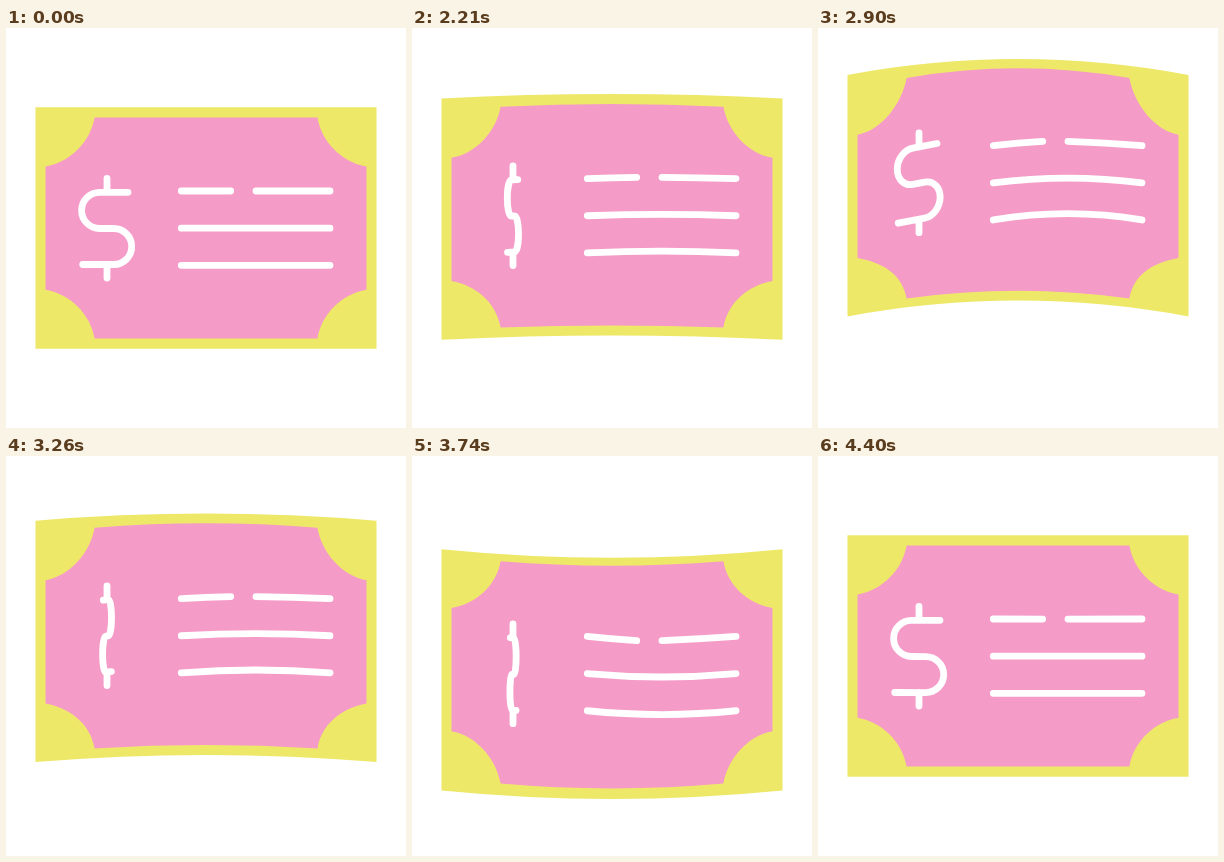
Animation of 400x400 px, one loop 4.43 s. Source, as an HTML page:

```html
<!DOCTYPE html>
<html lang="en">
<head>
<meta charset="utf-8">
<title>Flying banknote</title>
<style>
  html, body { margin: 0; height: 100%; overflow: hidden; background: #fff; }
  svg { display: block; width: 100vw; height: 100vh; }
  .ink { fill: none; stroke: #fff; stroke-width: 6.8; stroke-linecap: round; stroke-linejoin: round; }
</style>
</head>
<body>
<svg viewBox="0 0 400 400">
  <path id="paper" fill="#eee868"/>
  <path id="panel" fill="#f59bc8"/>
  <path id="lines" class="ink"/>
  <path id="dollar" class="ink" vector-effect="non-scaling-stroke"
    d="M122 164.3H93.7a18 18 0 0 0 0 36.2H107.7a18 18 0 0 1 0 36H76.7M101 150.3V164.3M101 236.5V250"/>
</svg>
<script>
const LOOP = 4430, REST = 2030, START = 2000;
const [paper, panel, lines, dollar] =
  ['paper', 'panel', 'lines', 'dollar'].map(id => document.getElementById(id));

// Cubic bezier easing with end handles at (a, 0) and (b, 1)
function ease(x, a, b) {
  let lo = 0, hi = 1;
  for (let i = 0; i < 24; i++) {
    const s = (lo + hi) / 2, r = 1 - s;
    if (3 * a * s * r * r + 3 * b * s * s * r + s * s * s < x) lo = s; else hi = s;
  }
  return lo * lo * (3 - 2 * lo);
}

// Segments: end time, value reached, easing handles
const segments = [[2810, -49, .45, .09], [3820, 23, .52, .5], [4420, 0, .45, .5]];

function liftAt(t) {
  if (t < REST) return 0;
  let from = START, value = 0;
  for (const [end, next, a, b] of segments) {
    if (t < end) return value + (next - value) * ease((t - from) / (end - from), a, b);
    from = end;
    value = next;
  }
  return value;
}

// Two turns: steady speed, then an even slowdown to rest
function spinAt(t) {
  if (t < REST) return 0;
  const speed = .365, steady = 1480, time = t - START;
  if (time < steady) return speed * time;
  const slowdown = 2 * (720 - speed * steady) / speed;
  const d = Math.min(time - steady, slowdown);
  return speed * (steady + d - d * d / (2 * slowdown));
}

function draw(t) {
  const m = liftAt(t);
  // Share of the lift for a point, on the way up and on the way down
  const move = (y, up, down) => y + m * (m < 0 ? up : down);
  // Parabola through its middle height to the end point
  const arch = (mid, x, end, cx = 200) => `Q${cx} ${2 * mid - end} ${x} ${end}`;

  const top = move(79.3, .67, .62), bottom = move(320.7, .67, .62);
  paper.setAttribute('d',
    `M29.5 ${top}${arch(79.3 + m, 370.5, top)}V${bottom}${arch(320.7 + m, 29.5, bottom)}Z`);

  const pt = move(89.5, .82, .7), pb = move(310.5, .83, .76);
  const side = move(0, .66, .6), st = 138.5 + side, sb = 261.8 + side;
  panel.setAttribute('d',
    `M39.5 ${st}C64.3 ${st - 4.4} 84.3 ${pt + 24.6} 88.6 ${pt}` +
    arch(move(89.5, 1.02, .9), 311.4, pt) +
    `C315.7 ${pt + 24.6} 335.7 ${st - 4.4} 360.5 ${st}V${sb}` +
    `C335.7 ${sb + 4.4} 315.7 ${pb - 24.6} 311.4 ${pb}` +
    arch(move(310.5, .99, .98), 88.6, pb) +
    `C84.3 ${pb - 24.6} 64.3 ${sb + 4.4} 39.5 ${sb}Z`);

  const [y1, y2, y3] = [163, 200.2, 237.3].map(y => move(y, .94, .78));
  const inner = move(163, 1.03, .97), bend = move(163, 1, .9);
  lines.setAttribute('d',
    `M175.3 ${y1}Q200 ${bend} 224.7 ${inner}M250 ${inner}Q287 ${bend} 324 ${y1}` +
    `M175.3 ${y2}${arch(move(200.2, 1.04, .93), 324, y2, 249.7)}` +
    `M175.3 ${y3}${arch(move(237.3, 1.07, .95), 324, y3, 249.7)}`);

  const turn = Math.cos(spinAt(t) * Math.PI / 180), slope = .004 * m;
  dollar.setAttribute('transform',
    `translate(101 ${move(0, .94, .79)}) matrix(${turn} ${slope * turn} 0 1 0 0) translate(-101 0)`);
}

const begin = performance.now();
function tick() {
  draw((performance.now() - begin) % LOOP);
  requestAnimationFrame(tick);
}
tick();
</script>
</body>
</html>
```
